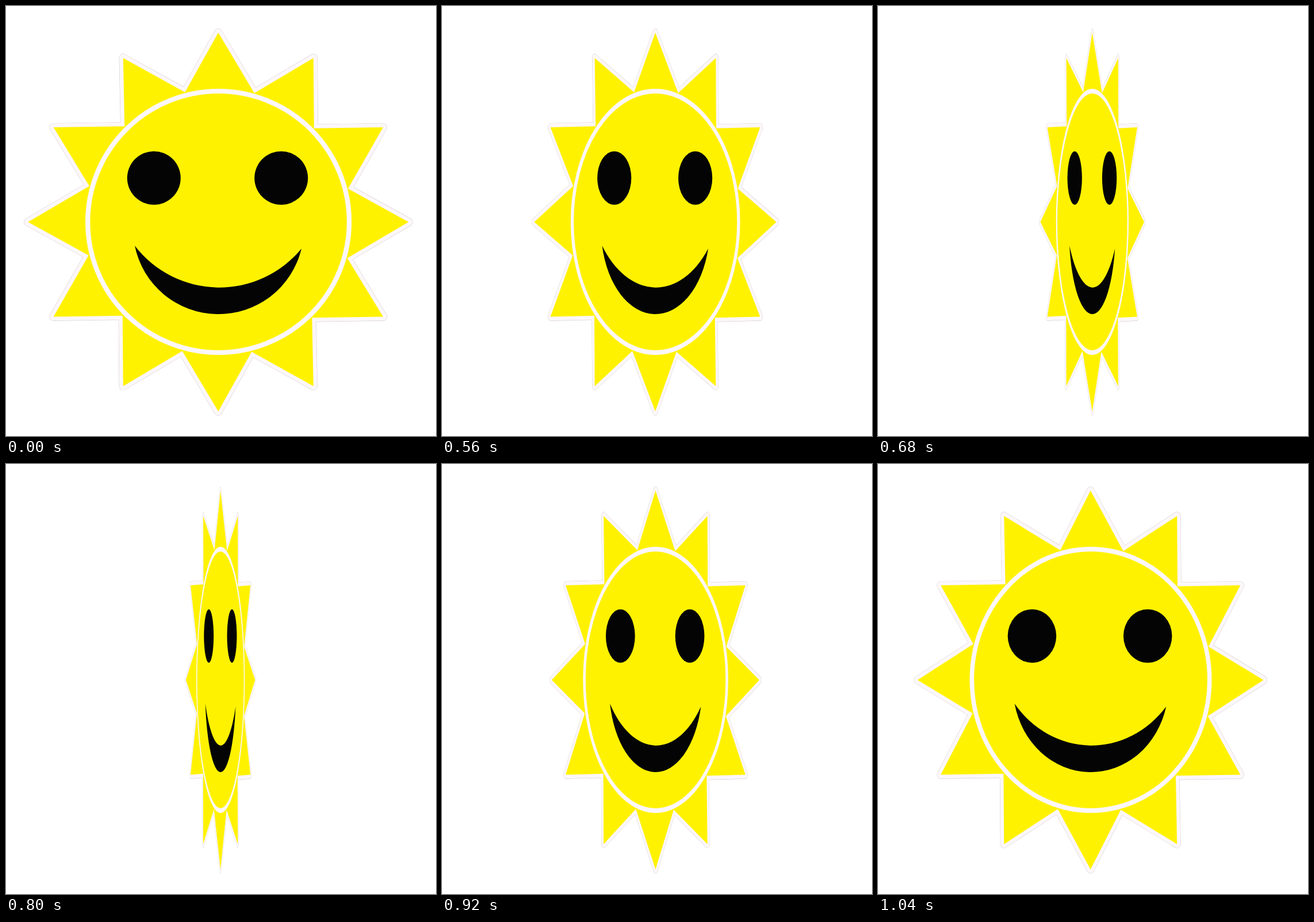
Write an HTML page that moves like this. It is 748 px wide and 748 px high and loops after 1.1 s.

```html
<!DOCTYPE html>
<html lang="en">
<head>
<meta charset="utf-8">
<title>Spinning sun</title>
<style>
  html, body { margin: 0; width: 100%; height: 100%; overflow: hidden; background: #fff; }
  svg { display: block; width: 100vw; height: 100vh; }
</style>
</head>
<body>
<svg viewBox="0 0 748 748">
  <g id="sun">
    <g stroke-linejoin="round">
      <path class="rays" fill="none" stroke="#c6bfc2" stroke-width="14.3"/>
      <path class="rays" fill="none" stroke="#fcf7fa" stroke-width="13.5"/>
      <path class="rays" fill="#fff200"/>
    </g>
    <circle cx="369.6" cy="375.5" r="227.4" fill="#fff200" stroke="#fcf7fa" stroke-width="8.3"/>
    <g fill="#040404">
      <circle cx="257.3" cy="299.2" r="46.5"/>
      <circle cx="478.7" cy="299.2" r="46.5"/>
      <path d="M224 417A148.5 148.5 0 0 0 514 422A185 185 0 0 1 224 417Z"/>
    </g>
  </g>
</svg>
<script>
  const CENTER = 374, HOLD = 500, STEP = 60, LOOP = 1100;
  const RAYS = 12;

  // Point around the sun's middle; degrees run clockwise from the top.
  function polar(deg, rx, ry) {
    const a = deg * Math.PI / 180;
    return [369.3 + rx * Math.sin(a), 375.8 - ry * Math.cos(a)];
  }

  // Each ray is a tip followed by a valley, the valleys turned slightly.
  function rayPath() {
    const points = [];
    for (let i = 0; i < RAYS; i++) {
      const deg = i * 360 / RAYS;
      points.push(polar(deg, 331, 329.5), polar(deg + 15.6, 233, 233));
    }
    return "M" + points.join("L") + "Z";
  }

  const d = rayPath();
  document.querySelectorAll(".rays").forEach(p => p.setAttribute("d", d));

  const sun = document.getElementById("sun");

  // Narrows in steps of 2/11 down to 1/11, then widens from 2/11 to 10/11.
  function widthAt(t) {
    const n = t < HOLD ? 0 : 1 + Math.floor((t - HOLD) / STEP);
    return (n <= 5 ? 11 - 2 * n : 2 * (n - 5)) / 11;
  }

  function draw(t) {
    const s = widthAt(t % LOOP);
    sun.setAttribute("transform", `matrix(${s} 0 0 1 ${CENTER * (1 - s)} 0)`);
  }

  const start = performance.now();
  function tick() {
    draw(performance.now() - start);
    requestAnimationFrame(tick);
  }
  tick();
</script>
</body>
</html>
```
